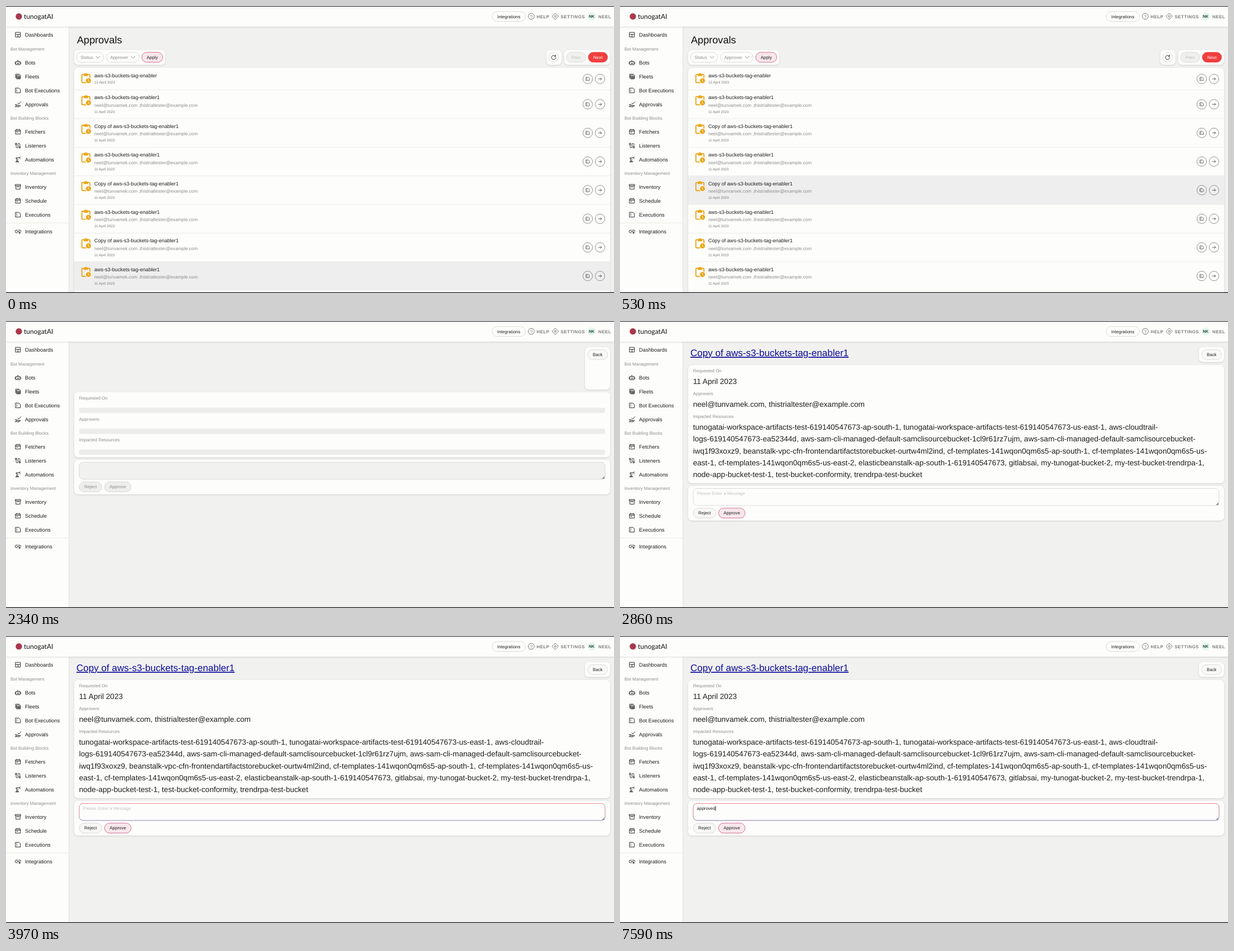
An HTML page that plays this animation: 1088 by 515 pixels, repeating every 8 s.

```html
<!DOCTYPE html>
<html lang="en">
<head>
<meta charset="utf-8">
<title>Approvals</title>
<style>
html, body { margin: 0; width: 100%; height: 100%; overflow: hidden; background: #f1f1ef; }
svg { display: block; width: 1088px; height: 515px; font-family: "Liberation Sans", Arial, sans-serif; text-rendering: geometricPrecision; }
.card { fill: #fdfdfc; filter: drop-shadow(0 1px 1.5px #0002); }
.icon { fill: none; stroke: #1f1f1f; stroke-width: 2; stroke-linejoin: round; stroke-linecap: round; }
</style>
</head>
<body>
<svg id="stage" viewBox="0 0 1088 515"></svg>
<script>
const LOOP = 8000;
const INK = '#1f1f1f', GREY = '#8c8c8c', LINE = '#d2d2d0', PINK = '#c9507e', BLUSH = '#f7e7ec', ORANGE = '#eba61a';
const BRAND = 'tunogat', MAILS = ['neel@tunvamek.com', 'thistrialtester@example.com'];
const JOB = 'aws-s3-buckets-tag-enabler';

// Text is placed by its left (or middle) x and the centre of its capitals.
const text = (x, cy, size, s, fill = INK, more = '') =>
  `<text x="${x}" y="${cy + size * 0.35}" font-size="${size}" fill="${fill}" ${more}>${s}</text>`;
const rect = (x, y, w, h, r = 0, more = '') =>
  `<rect x="${x}" y="${y}" width="${w}" height="${h}" rx="${r}" ${more}/>`;
const card = (x, y, w, h) => rect(x, y, w, h, 7, 'class="card"');
const circle = (x, y, r, more) => `<circle cx="${x}" cy="${y}" r="${r}" ${more}/>`;
const pill = (x, cy, w, label, fill = '#fdfdfc', stroke = LINE, color = INK, labelX = x + w / 2) =>
  rect(x, cy - 8.9, w, 17.8, 8.9, `fill="${fill}" stroke="${stroke}" stroke-width=".8"`) +
  text(labelX, cy, 7.93, label, color, 'text-anchor="middle"');
const icon = (x, y, path, scale = 0.47, more = '') =>
  `<path class="icon" transform="translate(${x} ${y}) scale(${scale}) translate(-12 -12)" d="${path}" ${more}/>`;

const NOTE = 'M3 3h12l6 5v13H3zM7 8h1M7 12h1M7 16h1';
const CALENDAR = 'M3 5h18v16H3zM3 10h18M8 2v4M16 2v4M8 14h2v1H8z';
const ARROW = 'M4 12h16M14 6l6 6-6 6';
const CHEVRON = 'M5 8l7 8 7-8';
const MENU = [
  [51.5, 'Dashboards', 'M3 3h18v18H3zM3 11h18M12 11v10'],
  [101.5, 'Bots', 'M4 8h16v12H4zM12 8V4h-2M1 12v4M23 12v4M9 12v1M15 12v1M9 16h6'],
  [126.5, 'Fleets', 'M7 7h14v14H7zM7 12h14M7 16.5h14M12 12v9M17 12v9M3 17V3h14'],
  [151.5, 'Bot Executions', NOTE],
  [176.5, 'Approvals', 'M1 13h4v8H1M5 14h5l5 3h-5M5 20l8 2 9-5q-1-2-3-1l-4 1M11 7l4 4 8-9'],
  [225.5, 'Fetchers', CALENDAR],
  [250.5, 'Listeners', 'M3 3h4v5H3zM5 8v9a3.5 3.5 0 0 0 7 0V7a3.5 3.5 0 0 1 7 0v9M17 16h4v5h-4z'],
  [275.5, 'Automations', 'M3 21h12M6 21v-4h6v4M9 17L5 8M5 8a2 2 0 1 1 3-3l8 0M8 8l5 5M21 2l-5 3 5 4'],
  [324.5, 'Inventory', 'M2 3h20v5H2zM4 8v13h16V8M9 12h6'],
  [349.5, 'Schedule', CALENDAR],
  [374.5, 'Executions', NOTE],
  [404.5, 'Integrations', 'M10 7H6a5 5 0 0 0 0 10h4M14 7h4a5 5 0 0 1 5 5M8 12h8M14 17h8M18 13v8']
];

function frameParts() {
  const bold = 'font-weight="700" letter-spacing=".5"';
  const gear = Array.from({ length: 16 }, (_, i) => {
    const a = (i - 0.5) * Math.PI / 8, r = i % 4 < 2 ? 11 : 8.6;
    return `${i ? 'L' : 'M'}${12 + r * Math.cos(a)} ${12 + r * Math.sin(a)}`;
  }).join('') + 'zM15.5 12a3.5 3.5 0 1 1-7 0a3.5 3.5 0 1 1 7 0z';
  return rect(0, 36, 112, 480, 0, 'fill="#fdfdfc" style="filter:drop-shadow(0 0 1px #0002)"') +
    rect(0, 0, 1088, 37, 0, 'class="card"') +
    circle(23, 18.8, 5.7, 'fill="#a8394d"') +
    text(32, 18.3, 12, BRAND + 'AI', '#111', 'font-family="Lato, sans-serif"') +
    pill(870, 18.8, 59.5, 'Integrations') +
    circle(940, 18.6, 5.4, 'fill="none" stroke="#777"') +
    text(940, 18.7, 8, '?', '#777', 'text-anchor="middle"') +
    text(949.5, 18.8, 7.93, 'HELP', '#7d7d7d', bold) +
    icon(982.8, 18.6, gear, 0.47, 'style="stroke:#777"') +
    text(992.5, 18.8, 7.93, 'SETTINGS', '#7d7d7d', bold) +
    circle(1048, 18.6, 7.2, 'fill="#e2f5ee"') +
    text(1048, 18.7, 7, 'NK', '#24443c', 'font-weight="700" text-anchor="middle"') +
    text(1060, 18.8, 7.93, 'NEEL', '#7d7d7d', bold) +
    MENU.map(([y, label, path]) => icon(21.5, y, path) + text(34, y, 9.37, label)).join('') +
    [[77, 'Bot Management'], [201, 'Bot Building Blocks'], [299.8, 'Inventory Management']]
      .map(([y, s]) => text(8, y, 7.95, s, GREY)).join('') +
    rect(0, 388.8, 112, 0.9, 0, 'fill="#e9e9dc"') +
    rect(0, 0, 1088, 1, 0, 'fill="#16161c"') + rect(0, 513.7, 1088, 1.3, 0, 'fill="#16161c"');
}

const clipboard = y =>
  `<g transform="translate(143 ${y})">` +
  rect(-7.2, -6.5, 14.4, 14.6, 1.2, `fill="none" stroke="${ORANGE}" stroke-width="1.9"`) +
  `<path d="M-3.8-8h2q1.8-2.4 3.6 0h2v4.4h-7.6z" fill="${ORANGE}"/>` +
  circle(4.6, 4.6, 5.8, 'fill="#fdfdfc"') + circle(4.6, 4.6, 4.6, `fill="${ORANGE}"`) +
  '<path d="M4.4 2v3l1.9 1.6" fill="none" stroke="#fff" stroke-width=".9"/></g>';

function row(i) {
  const y = i ? 150.7 + 51.35 * (i - 1) : 111, h = i ? 51.35 : 39.7, mid = y + h / 2;
  const title = i ? (i % 2 ? '' : 'Copy of ') + JOB + '1' : JOB;
  const ring = x => circle(x, mid, 8.6, 'fill="none" stroke="#777" stroke-width=".8"');
  return rect(122, y, 959, h, 0, `id="row${i}" fill="#eeeeef" opacity="0"`) +
    rect(122, y + h - 0.4, 959, 0.8, 0, 'fill="#e9e9e8"') +
    clipboard(y + 18.4) + text(158, y + 13.6, 9.09, title) +
    (i ? text(158, y + 27.4, 8.2, MAILS.join(' ,'), GREY) : '') +
    text(158, y + (i ? 39.1 : 25.6), 6.36, (i ? 11 : 12) + ' April 2023', '#7a7a7a') +
    ring(1041) + icon(1041, mid, NOTE, 0.32) + ring(1063) + icon(1063, mid, ARROW, 0.34) +
    (i == 4 ? circle(1063, mid, 8.6, `id="go" fill="none" stroke="${PINK}" stroke-width=".9" opacity="0"`) : '');
}

function listPage() {
  return text(127, 60.5, 18.13, 'Approvals', '#111') +
    card(122, 79, 163, 26.5) + pill(126, 92, 48.5, 'Status', undefined, LINE, GREY, 144.5) +
    pill(180, 92, 58, 'Approver', undefined, LINE, GREY, 202.5) +
    icon(164.5, 92, CHEVRON, 0.45, 'style="stroke:#888"') + icon(227.5, 92, CHEVRON, 0.45, 'style="stroke:#888"') +
    pill(243, 92, 37.5, 'Apply', BLUSH, PINK) +
    card(967, 79, 27, 26.5) + circle(980, 92, 8.8, `fill="none" stroke="${LINE}" stroke-width=".8"`) +
    icon(980, 92, 'M19 8a8.5 8.5 0 1 0 1.5 5M20 3v5h-5', 0.45) +
    card(999, 79, 82, 26.5) + pill(1003, 92, 34.5, 'Prev', '#f0f0ef', LINE, '#bcbcbc') +
    pill(1042, 92, 34.5, 'Next', '#f03f3f', '#f03f3f', '#fff') +
    card(122, 111, 959, 420) + Array.from({ length: 8 }, (_, i) => row(i)).join('');
}

const RESOURCES = [
  `${BRAND}ai-workspace-artifacts-test-619140547673-ap-south-1, ${BRAND}ai-workspace-artifacts-test-619140547673-us-east-1, aws-cloudtrail-`,
  'logs-619140547673-ea52344d, aws-sam-cli-managed-default-samclisourcebucket-1cl9r61rz7ujm, aws-sam-cli-managed-default-samclisourcebucket-',
  'iwq1f93xoxz9, beanstalk-vpc-cfn-frontendartifactstorebucket-ourtw4ml2ind, cf-templates-141wqon0qm6s5-ap-south-1, cf-templates-141wqon0qm6s5-us-',
  `east-1, cf-templates-141wqon0qm6s5-us-east-2, elasticbeanstalk-ap-south-1-619140547673, gitlabsai, my-${BRAND}-bucket-2, my-test-bucket-trendrpa-1,`,
  'node-app-bucket-test-1, test-bucket-conformity, trendrpa-test-bucket'
];
const LABELS = ['Requested On', 'Approvers', 'Impacted Resources'];

// The message box with its two buttons; y is the top of its card.
const form = (y, box, buttons) => card(122, y, 959, 62) +
  rect(131, y + 4.5, 941, 30.5, 7, box) +
  `<path d="M1071 ${y + 29.5}v4.7h-5z" fill="#8f8c9c"/>` + buttons(y + 48.7);

function loadingPage() {
  return card(1036, 47, 45, 76) + pill(1041, 60.3, 35.5, 'Back', '#f9f9f8') + card(122, 127.5, 959, 117) +
    LABELS.map((s, i) => text(130.7, 138.5 + 37.4 * i, 7.93, s, GREY) +
      rect(131, 155.7 + 37.5 * i, 941, 9.3, 2, 'fill="#ececeb"')).join('') +
    form(249, `fill="#f1f1ef" stroke="${LINE}" stroke-width=".8"`, y =>
      pill(131, y, 40.5, 'Reject', '#eeeeed', LINE, GREY) + pill(176.3, y, 47.5, 'Approve', '#eeeeed', LINE, GREY));
}

function detailPage() {
  return text(126, 57.3, 17.05, `Copy of ${JOB}1`, '#0d0b9b', 'text-decoration="underline"') +
    card(1036, 47, 45, 26.5) + pill(1041, 60.3, 35.5, 'Back', '#f9f9f8') + card(122, 79, 959, 212) +
    LABELS.map((s, i) => text(130.7, 89.7 + 40.7 * i, 7.93, s, GREY)).join('') +
    text(130.7, 108.5, 13.6, '11 April 2023') + text(130.7, 149.5, 13.6, MAILS.join(', ')) +
    RESOURCES.map((s, i) => text(130.7, 190 + 21.4 * i, 13.6, s)).join('') +
    form(296, `fill="#fdfdfc" stroke="${LINE}" stroke-width=".8"`, y =>
      pill(131, y, 40.5, 'Reject', '#f7f7f6') + pill(176.3, y, 47.5, 'Approve', BLUSH, PINK)) +
    rect(131, 300.5, 941, 30.5, 7, 'id="focus" fill="none" stroke="url(#edge)"') +
    text(137.6, 309.4, 7.93, '', INK, 'id="message"') +
    rect(0, 305, 0.8, 9, 0, 'id="caret" fill="#111"');
}

const stage = document.getElementById('stage');
stage.innerHTML = `<defs><linearGradient id="edge" x2="0" y2="1"><stop stop-color="#ee8288"/>
  <stop offset=".5" stop-color="#e58d9c"/><stop offset="1" stop-color="#9488b4"/></linearGradient></defs>
  <g id="list">${listPage()}</g><g id="loading">${loadingPage()}</g><g id="detail">${detailPage()}</g>` + frameParts();

const el = id => document.getElementById(id);
const show = (id, on) => el(id).style.display = on ? '' : 'none';
const ramp = (t, from, ms) => Math.min(1, Math.max(0, (t - from) / ms));
const KEYS = [4810, 5000, 5140, 5270, 5410, 5610, 5870, 6060];
// When the pointer enters rows 7, 6, 5 and 4 (counted from zero).
const ENTER = [-500, 20, 150, 280];

function draw(t) {
  show('list', t < 2140);
  show('loading', t >= 2140 && t < 2560);
  show('detail', t >= 2560);
  ENTER.forEach((from, k) => {
    const leave = ENTER[k + 1] ?? LOOP;
    el('row' + (7 - k)).setAttribute('opacity', Math.min(ramp(t, from, 160), 1 - ramp(t, leave, 160)));
  });
  el('go').setAttribute('opacity', t < 1410 ? 0 : 0.6 + 0.4 * ramp(t, 1410, 100));
  el('focus').setAttribute('opacity', 0.85 * ramp(t, 3100, 180) + 0.15 * ramp(t, 3970, 190));

  const typed = KEYS.filter(k => t >= k).length, message = el('message');
  message.textContent = typed ? 'approved'.slice(0, typed) : 'Please Enter a Message';
  message.setAttribute('fill', typed ? INK : '#c4c4c4');
  show('caret', typed);
  if (typed) el('caret').setAttribute('x', 137.6 + message.getComputedTextLength());
}

const start = performance.now();
function tick() {
  draw((performance.now() - start) % LOOP);
  requestAnimationFrame(tick);
}
tick();
</script>
</body>
</html>
```
